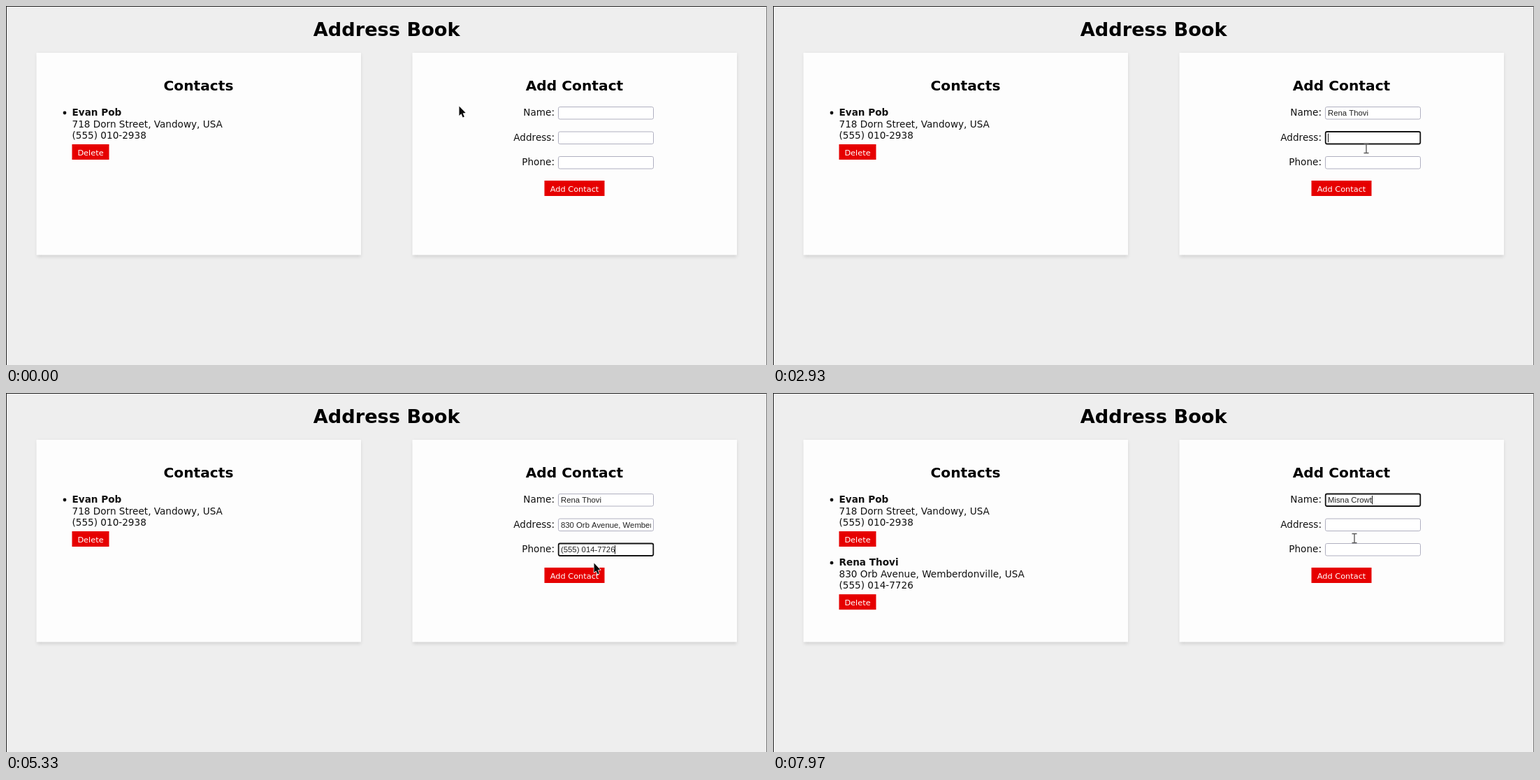
Animation, 1089 px wide and 514 px high, one loop 8000 ms. Source, as an HTML page with a canvas:

```html
<!DOCTYPE html>
<html lang="en">
<head>
<meta charset="utf-8">
<title>Address Book</title>
<style>
  html, body { margin: 0; width: 100%; height: 100%; overflow: hidden; background: #eee; }
  canvas { display: block; width: 1089px; height: 514px; }
</style>
</head>
<body>
<canvas id="stage" width="1089" height="514"></canvas>
<script>
const ctx = document.getElementById('stage').getContext('2d');
const LOOP = 8000;
const BLINK = 530;
const SANS = '"DejaVu Sans", Verdana, sans-serif';
const INPUT_FONT = '11.33px "Liberation Sans", Arial, sans-serif';
const RED = '#e60000';

const people = [
  { name: 'Evan Pob', address: '718 Dorn Street, Vandowy, USA', phone: '(555) 010-2938' },
  { name: 'Rena Thovi', address: '830 Orb Avenue, Wemberdonville, USA', phone: '(555) 014-7726' }
];
const nextName = 'Misna Crowt';

const fields = [
  { label: 'Name:', top: 144, base: 157 },
  { label: 'Address:', top: 179.5, base: 192.5 },
  { label: 'Phone:', top: 215, base: 228 }
];
const BOX = { x: 790, w: 137, h: 18.5 };

// Clicks and pastes, in order; each applies from its time on.
const ADDED = 5650;
const events = [
  { at: 1400, focus: 0 },
  { at: 1950, paste: people[1].name },
  { at: 2850, focus: 1 },
  { at: 3480, paste: people[1].address },
  { at: 4220, focus: 2 },
  { at: 4880, paste: people[1].phone },
  { at: ADDED, submit: true },
  { at: 6380, focus: 0 },
  { at: 7460, paste: nextName }
];

// Pointer moves: start time, end time, destination.
const origin = [648, 143];
const moves = [
  [250, 1352, 845, 148],
  [2380, 2800, 848, 188],
  [3720, 4170, 841, 224],
  [5050, 5569, 841, 258],
  [5800, 6320, 827, 153],
  [7560, 7920, 831, 192]
];

function pointerAt(t) {
  let [x, y] = origin;
  for (const [start, end, tx, ty] of moves) {
    const u = Math.min(1, Math.max(0, (t - start) / (end - start)));
    const k = u * u * (3 - 2 * u);
    x += (tx - x) * k;
    y += (ty - y) * k;
  }
  return { x, y };
}

function formAt(t) {
  const form = { values: ['', '', ''], focus: -1, since: 0 };
  for (const e of events) {
    if (t < e.at) break;
    form.since = e.at;
    if (e.submit) {
      form.values = ['', '', ''];
      form.focus = -1;
    } else if (e.paste) {
      form.values[form.focus] = e.paste;
    } else {
      form.focus = e.focus;
    }
  }
  return form;
}

function text(str, x, y, font, align = 'left', color = '#111') {
  ctx.font = font;
  ctx.textAlign = align;
  ctx.fillStyle = color;
  ctx.fillText(str, x, y);
}

const plain = size => `${size}px ${SANS}`;
const bold = size => `bold ${size}px ${SANS}`;

function card(x) {
  ctx.save();
  ctx.shadowColor = 'rgba(0,0,0,.13)';
  ctx.shadowBlur = 5;
  ctx.shadowOffsetY = 2;
  ctx.fillStyle = '#fdfdfd';
  ctx.fillRect(x, 67, 464.5, 289.5);
  ctx.restore();
}

function button(label, x, y, w) {
  ctx.fillStyle = RED;
  ctx.fillRect(x, y, w, 22);
  text(label, x + w / 2, y + 15.7, plain(11.33), 'center', '#fff');
}

function contact(p, y) {
  ctx.fillStyle = '#111';
  ctx.beginPath();
  ctx.arc(84, y + 153, 2.4, 0, Math.PI * 2);
  ctx.fill();
  text(p.name, 94.5, y + 157, bold(13.6));
  text(p.address, 94.5, y + 173.5, plain(13.6));
  text(p.phone, 94.5, y + 190, plain(13.6));
  button('Delete', 94.5, y + 198, 53);
}

function outline(x, y, w, h, width, color) {
  ctx.lineWidth = width;
  ctx.strokeStyle = color;
  ctx.beginPath();
  ctx.roundRect(x, y, w, h, 2.2);
  ctx.stroke();
}

function input(field, value, focused, caret) {
  const { x, w, h } = BOX;
  const y = field.top;
  text(field.label, 785, field.base, plain(13.6), 'right');
  ctx.fillStyle = '#fff';
  ctx.fillRect(x + 1, y + 1, w - 2, h - 2);
  if (focused) outline(x + .7, y + .5, w - 1.4, h - 1, 1.8, '#151515');
  else outline(x + .5, y + .5, w - 1, h - 1, 1, '#b0b0c0');

  ctx.save();
  ctx.beginPath();
  ctx.rect(x + 3, y + 1, w - 7, h - 2);
  ctx.clip();
  ctx.font = INPUT_FONT;
  const width = ctx.measureText(value).width;
  const scroll = focused ? Math.max(0, width - 127.5) : 0;
  text(value, x + 4 - scroll, field.base, INPUT_FONT, 'left', '#222');
  if (caret) {
    ctx.fillStyle = '#111';
    ctx.fillRect(Math.round(x + 4 + width - scroll), y + 3, 1, h - 6);
  }
  ctx.restore();
}

function arrow(x, y) {
  ctx.beginPath();
  for (const [dx, dy] of [[0, 0], [0, 13.5], [3, 10.8], [5.2, 16], [7.4, 15], [5.2, 10], [9.2, 9.6]]) {
    ctx.lineTo(x + dx, y + dy);
  }
  ctx.closePath();
  ctx.lineJoin = 'round';
  ctx.lineWidth = 1.4;
  ctx.strokeStyle = '#fff';
  ctx.stroke();
  ctx.fillStyle = '#0a0a0a';
  ctx.fill();
}

function beam(x, y) {
  ctx.beginPath();
  ctx.moveTo(x, y - 6.5);
  ctx.lineTo(x, y + 6.5);
  for (const end of [-6.5, 6.5]) {
    ctx.moveTo(x - 3.5, y + end);
    ctx.lineTo(x + 3.5, y + end);
  }
  ctx.lineWidth = 1.4;
  ctx.strokeStyle = '#5c5c5c';
  ctx.stroke();
}

function pointer({ x, y }) {
  const inside = fields.some(f => x > BOX.x && x < BOX.x + BOX.w && y > f.top && y < f.top + BOX.h);
  // The text cursor hangs below its hot spot.
  if (inside) beam(x + 1, y + 16);
  else arrow(x + .5, y + .5);
}

function draw(t) {
  ctx.fillStyle = '#eee';
  ctx.fillRect(0, 0, 1089, 514);
  ctx.fillStyle = '#222';
  ctx.fillRect(0, 0, 1089, 1);
  ctx.fillRect(0, 0, 1, 514);
  ctx.fillStyle = '#777';
  ctx.fillRect(1088, 0, 1, 514);

  text('Address Book', 544.7, 43, bold(27.2), 'center', '#000');
  card(43.5);
  card(581.5);
  text('Contacts', 275.5, 121, bold(20.2), 'center', '#000');
  text('Add Contact', 813.5, 121, bold(20.2), 'center', '#000');

  contact(people[0], 0);
  if (t >= ADDED) contact(people[1], 90.2);

  const form = formAt(t);
  const lit = Math.floor((t - form.since) / BLINK) % 2 === 0;
  fields.forEach((f, i) => {
    const focused = form.focus === i;
    input(f, form.values[i], focused, focused && lit);
  });
  button('Add Contact', 770.5, 250, 86);
  pointer(pointerAt(t));
}

const begin = performance.now();
function tick() {
  draw((performance.now() - begin) % LOOP);
  requestAnimationFrame(tick);
}
tick();
</script>
</body>
</html>
```
